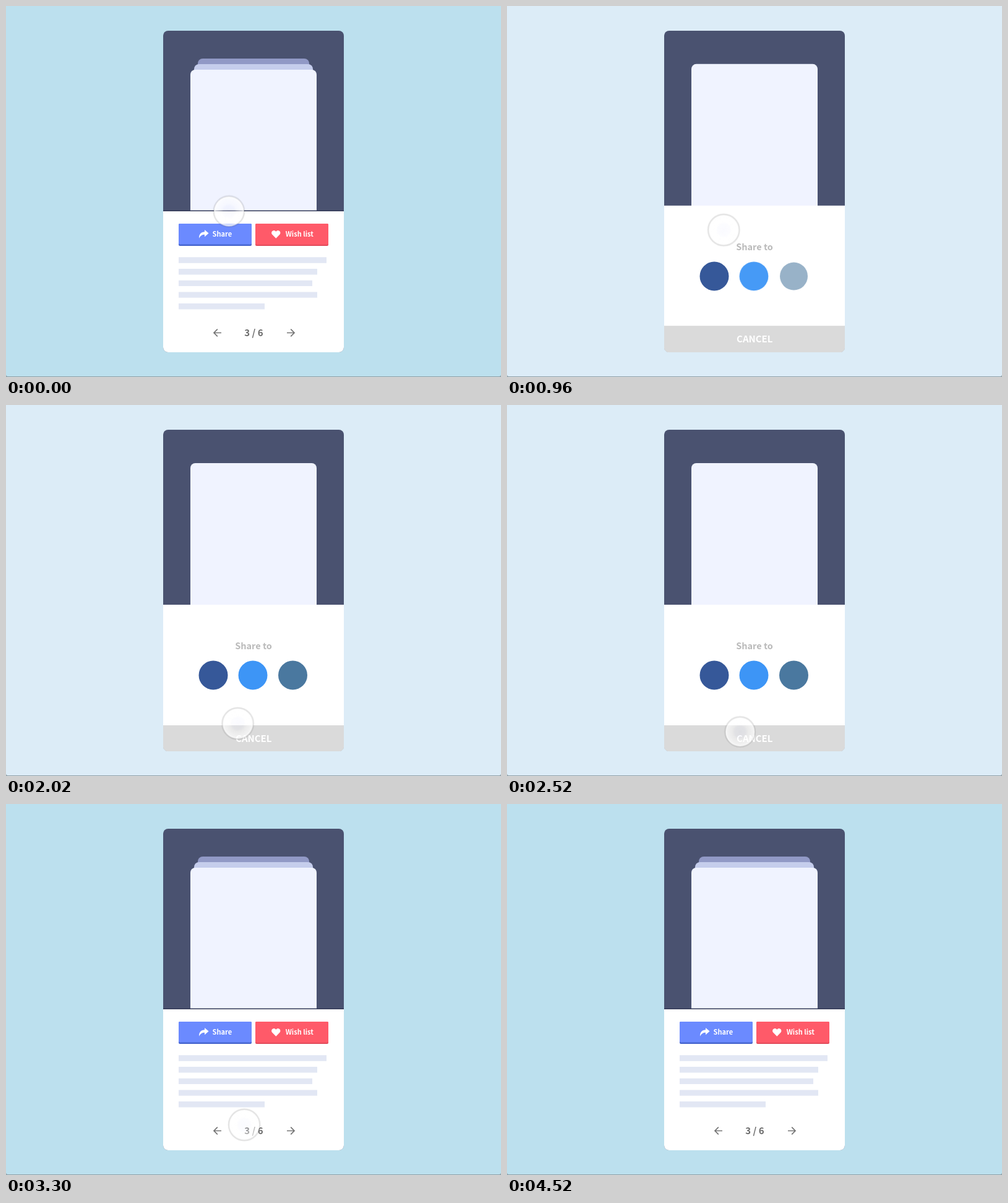
An HTML page for the animation above (4660 ms loop, 800x600 px).

```html
<!DOCTYPE html>
<html lang="en">
<head>
<meta charset="utf-8">
<title>Share panel</title>
<style>
  /* --p: 0 = details, 1 = share panel */
  @property --p { syntax: "<number>"; inherits: true; initial-value: 0; }

  html, body { margin: 0; width: 100%; height: 100%; overflow: hidden; background: #8f9fa6; }
  #stage {
    display: block; width: 800px; height: 600px;
    font-family: "Noto Sans CJK JP", "Noto Sans CJK SC", "Noto Sans CJK", "Noto Sans", sans-serif;
    font-weight: 600;
    animation: panel 4660ms infinite;
  }
  .bg { fill: color-mix(in srgb, #dcecf7 calc(var(--p) * 100%), #bce0ee); }
  .lift { transform: translateY(calc(var(--p) * -9px)); }
  .drop { transform: translateY(calc(var(--p) * 9px)); }
  .buttons { transform: translateY(calc(var(--p) * -6px)); }
  .lines { transform: translateY(calc(var(--p) * -13px)); }
  .fade { opacity: calc(1 - var(--p)); }
  .nav { opacity: calc(1 - var(--p) * 1.4); }
  .title { opacity: var(--p); transform: translateY(calc(10px - var(--p) * 10px)); }
  .cancel { transform: translateY(calc(42px - var(--p) * 42px)); }
  .icon { transform-box: fill-box; transform-origin: center; animation: 4660ms infinite; }
  .i1 { animation-name: pop1; }
  .i2 { animation-name: pop2; }
  .i3 { animation-name: pop3; }
  .cursor { animation: move 4660ms infinite; }
  .ring { animation: press 4660ms infinite; }

  @keyframes panel {
    0%, 11.59% { --p: 0; animation-timing-function: ease-in-out; }
    19.74%, 20.6% { --p: 1.02; }
    23.6%, 56.65% { --p: 1; animation-timing-function: ease-in-out; }
    65.67%, 100% { --p: 0; }
  }
  @keyframes pop1 {
    0%, 14.59% { opacity: 0; transform: scale(.9); animation-timing-function: ease-in-out; }
    20.17%, 56.65% { opacity: 1; transform: none; animation-timing-function: ease-in-out; }
    64%, 100% { opacity: 0; transform: scale(.9); }
  }
  @keyframes pop2 {
    0%, 15.88% { opacity: 0; transform: scale(.9); animation-timing-function: ease-in-out; }
    21.46%, 56.65% { opacity: 1; transform: none; animation-timing-function: ease-in-out; }
    64%, 100% { opacity: 0; transform: scale(.9); }
  }
  @keyframes pop3 {
    0%, 17.6% { opacity: 0; transform: scale(.9); animation-timing-function: ease-in-out; }
    23.18%, 56.65% { opacity: 1; transform: none; animation-timing-function: ease-in-out; }
    64%, 100% { opacity: 0; transform: scale(.9); }
  }
  @keyframes move {
    0% { transform: translate(360.3px, 332px); animation-timing-function: ease; }
    11.16%, 36.05% { transform: translate(350.3px, 362.2px); animation-timing-function: ease; }
    47.2%, 70.39% { transform: translate(376.7px, 528.5px); animation-timing-function: cubic-bezier(.25, .1, .5, .88); }
    82.2% { transform: translate(793px, 49px); animation-timing-function: cubic-bezier(.2, .6, .3, 1); }
    96.8%, 100% { transform: translate(789px, -28px); }
  }
  @keyframes press {
    0% { transform: scale(.98); }
    11.16% { transform: scale(1); }
    13.3%, 15% { transform: scale(.94); }
    19%, 48% { transform: scale(1); }
    52%, 57% { transform: scale(.96); }
    62%, 100% { transform: scale(1); }
  }
</style>
</head>
<body>
<svg id="stage" viewBox="0 0 800 600">
  <defs>
    <clipPath id="card"><rect x="254" y="40" width="292" height="520" rx="8"/></clipPath>
    <radialGradient id="glass">
      <stop offset="0" stop-color="#eceeff" stop-opacity=".25"/>
      <stop offset=".38" stop-color="#f4f5ff" stop-opacity=".3"/>
      <stop offset=".5" stop-color="#fff" stop-opacity=".4"/>
      <stop offset="1" stop-color="#fff" stop-opacity=".75"/>
    </radialGradient>
  </defs>

  <path class="bg" d="M0 0H800V596Q800 599 797 599H3Q0 599 0 596Z"/>

  <g clip-path="url(#card)">
    <rect x="254" y="40" width="292" height="520" fill="#4a5270"/>
    <rect class="drop" x="310" y="85" width="180" height="200" rx="8" fill="#9199c6"/>
    <rect x="304" y="94" width="192" height="200" rx="8" fill="#c5cdec"/>
    <rect class="lift" x="298" y="103" width="204" height="260" rx="8" fill="#f0f3ff"/>

    <g class="lift">
      <rect class="fade" x="254" y="330.5" width="292" height="2" fill="#343b58" opacity=".3"/>
      <rect x="254" y="332" width="292" height="260" fill="#fff"/>

      <g class="buttons"><g class="fade" font-size="11" fill="#fff">
        <rect x="279" y="352" width="118" height="36" rx="2" fill="#4766cf"/>
        <rect x="279" y="352" width="118" height="33.5" rx="2" fill="#6b8aff"/>
        <path d="M312 375.8C311.6 368.6 315.5 365.4 321 365.2V362L327.6 367.6L321 373.2V369.8C317 369.7 314.2 371.4 312 375.8Z"/>
        <text x="333.6" y="373">Share</text>
        <rect x="403" y="352" width="118" height="36" rx="2" fill="#e24a5a"/>
        <rect x="403" y="352" width="118" height="34" rx="2" fill="#ff5a69"/>
        <path d="M436.3 375.8L430.4 369.8C426.6 365.4 432.6 360 436.3 364.8C440 360 446 365.4 442.2 369.8Z"/>
        <text x="451.8" y="373">Wish list</text>
      </g></g>

      <g class="lines"><path class="fade" stroke="#e2e7f4" stroke-width="9.4"
        d="M279 411H518M279 429.7H503M279 448.4H495M279 467.1H503M279 485.8H418"/></g>

      <g class="nav" fill="#6b6b6b">
        <path d="M348 528.5H336M341.8 522.7L336 528.5L341.8 534.3M454 528.5H466M460.2 522.7L466 528.5L460.2 534.3"
          fill="none" stroke="#757575" stroke-width="1.7"/>
        <text x="400.5" y="534" font-size="15" text-anchor="middle">3 / 6</text>
      </g>
    </g>

    <g class="title">
      <text x="400" y="395" font-size="14.5" text-anchor="middle" fill="#bababa">Share to</text>
    </g>
    <circle class="icon i1" cx="335" cy="437" r="23.5" fill="#365899"/>
    <circle class="icon i2" cx="399" cy="437" r="23.5" fill="#3d95f6"/>
    <circle class="icon i3" cx="463.5" cy="437" r="23.5" fill="#4a789f"/>

    <g class="cancel">
      <rect x="254" y="518" width="292" height="46" fill="#dadada"/>
      <text x="400.3" y="544.7" font-size="15" text-anchor="middle" fill="#fff">CANCEL</text>
    </g>
  </g>

  <g class="cursor"><g class="ring">
    <circle r="25" fill="url(#glass)"/>
    <circle r="23.4" fill="none" stroke="#fff" stroke-opacity=".5" stroke-width="1.4"/>
    <circle r="25.2" fill="none" stroke="#000" stroke-opacity=".11" stroke-width="2.4"/>
  </g></g>
</svg>
</body>
</html>
```
